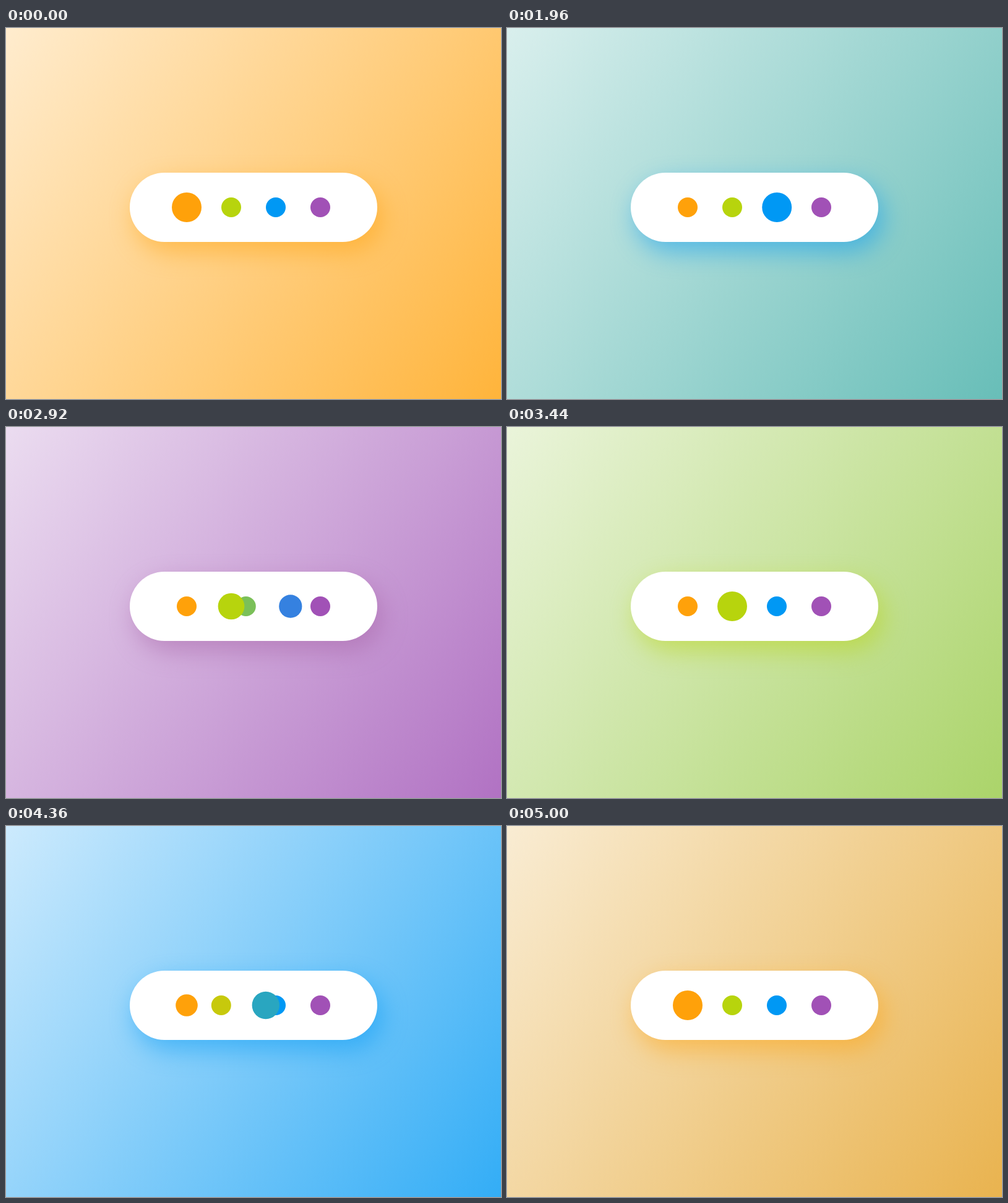
An HTML page that plays this animation: 800x600 px, repeating every 5040 ms.

```html
<!DOCTYPE html>
<html lang="en">
<head>
<meta charset="utf-8">
<title>Dot switcher</title>
<style>
  html, body { margin: 0; width: 100%; height: 100%; overflow: hidden; }
  svg { display: block; width: 100vw; height: 100vh; }
</style>
</head>
<body>
<svg viewBox="0 0 800 600" preserveAspectRatio="none">
  <defs>
    <linearGradient id="sky" gradientUnits="userSpaceOnUse" x1="0" y1="0" x2="800" y2="600">
      <stop id="light" offset="0"/>
      <stop id="deep" offset="1"/>
    </linearGradient>
    <filter id="soft" filterUnits="userSpaceOnUse" x="80" y="120" width="660" height="380" color-interpolation-filters="sRGB">
      <feGaussianBlur stdDeviation="20"/>
    </filter>
  </defs>
  <rect width="800" height="600" fill="url(#sky)"/>
  <rect id="shadow" x="208" y="250" width="400" height="112" rx="56" opacity=".5" filter="url(#soft)"/>
  <rect x="200" y="234" width="400" height="112" rx="56" fill="#fff"/>
  <g id="dots"></g>
</svg>
<script>
const LOOP = 5040, STEP = 360, SHADOW_DELAY = 200, SKY_DELAY = 400;
const SMALL = 16, BIG = 24;
const DOTS = [[255, 161, 10], [183, 212, 13], [0, 152, 244], [161, 81, 182]];
const SKIES = [[255, 161, 10], [150, 201, 69], [0, 152, 244], [157, 79, 180]];
// [start time, from, to]
const MOVES = [[640, 0, 1], [1360, 1, 2], [1960, 2, 3], [2680, 3, 1], [3480, 1, 2], [4280, 2, 0]];

const el = id => document.getElementById(id);
const clamp = v => Math.max(0, Math.min(1, v));
const lerp = (a, b, p) => a + (b - a) * p;
const mix = (a, b, p) => a.map((v, i) => lerp(v, b[i], p));
const rgb = c => `rgb(${c.map(Math.round).join()})`;
const tint = (c, alpha) => rgb(mix([255, 255, 255], c, alpha));
const slotX = k => 292 + 72 * k;

const circles = Array.from({ length: 5 }, () => {
  const c = document.createElementNS("http://www.w3.org/2000/svg", "circle");
  c.setAttribute("cy", 290);
  return el("dots").appendChild(c);
});

// Colour of a delayed fade at time t
function fade(colors, delay, t) {
  let c = colors[0];
  for (const [start, , to] of MOVES) {
    c = mix(c, colors[to], clamp((t - start - delay) / STEP));
  }
  return c;
}

// Dots between the two slots shift one place; the chosen one grows on top
function layout(t) {
  const [start, from, to] = MOVES.filter(m => m[0] <= t).pop() || [0, 0, 0];
  const p = from === to ? 1 : clamp((t - start) / STEP);
  const dir = Math.sign(to - from);
  const list = [];
  const add = (k, r, next = k) => list.push({
    x: lerp(slotX(k), slotX(next), p),
    r,
    fill: rgb(mix(DOTS[k], DOTS[next], p))
  });
  for (let k = 0; k < 4; k++) {
    if (k === from || (k - from) * (k - to) > 0) add(k, SMALL);
  }
  for (let k = from; k !== to; k += dir) {
    add(k, k === from ? lerp(BIG, SMALL, p) : SMALL, k + dir);
  }
  add(to, lerp(SMALL, BIG, p));
  return list;
}

function draw(t) {
  const sky = fade(SKIES, SKY_DELAY, t);
  el("light").setAttribute("stop-color", tint(sky, 0.2));
  el("deep").setAttribute("stop-color", tint(sky, 0.8));
  el("shadow").setAttribute("fill", rgb(fade(DOTS, SHADOW_DELAY, t)));
  const list = layout(t);
  circles.forEach((c, i) => {
    const d = list[i] || { x: 0, r: 0, fill: "none" };
    c.setAttribute("cx", d.x);
    c.setAttribute("r", d.r);
    c.setAttribute("fill", d.fill);
  });
}

const begin = performance.now();
function tick() {
  draw((performance.now() - begin) % LOOP);
  requestAnimationFrame(tick);
}
tick();
</script>
</body>
</html>
```
